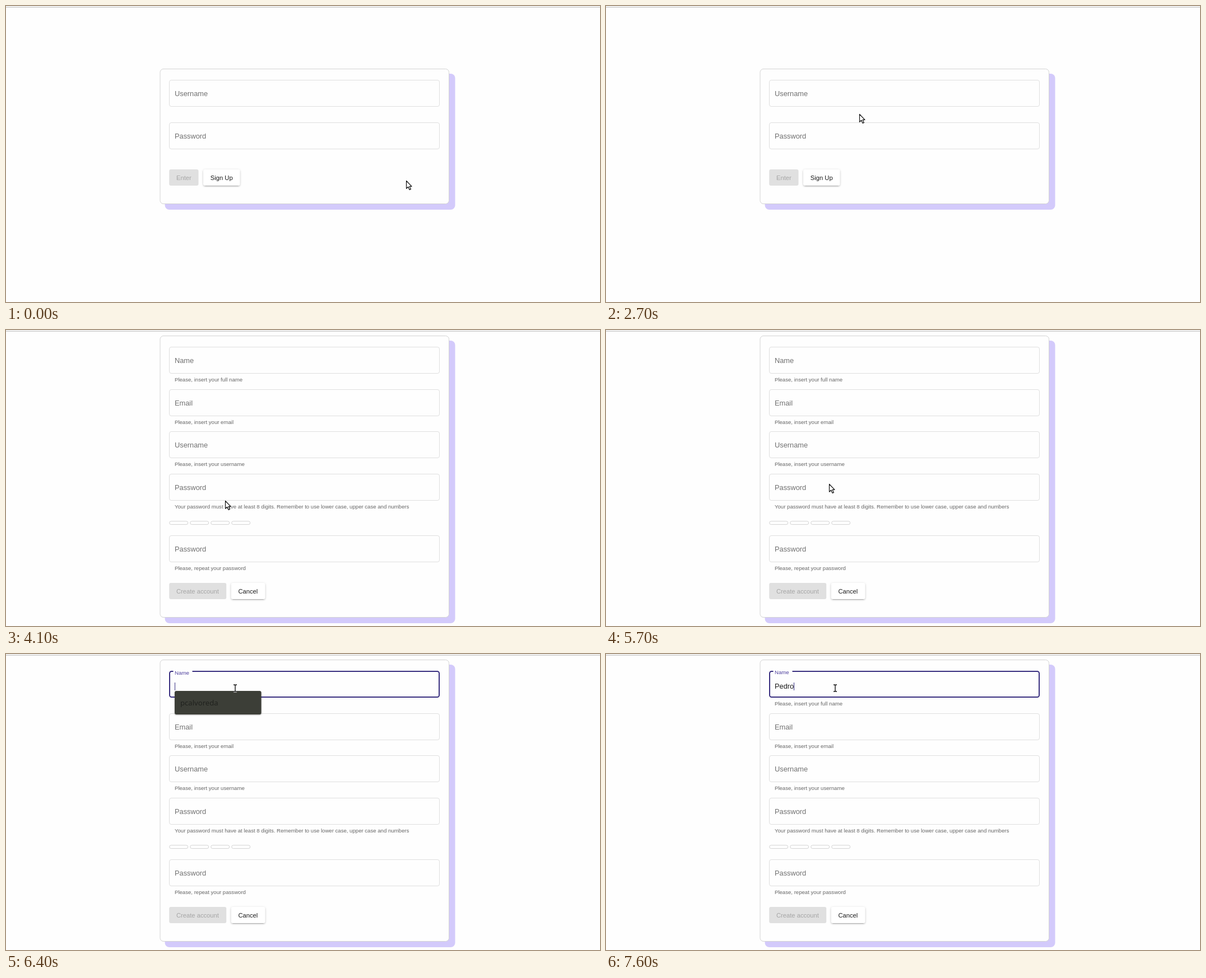
An HTML page for the animation above (8 s loop, 1060 px wide and 529 px high).

```html
<!DOCTYPE html>
<html lang="en">
<head>
<meta charset="utf-8">
<title>Sign up form</title>
<style>
  html, body { margin: 0; width: 100%; height: 100%; overflow: hidden; background: #fefefe; }
  svg { display: block; width: 1060px; height: 529px; }
  text { font: 12.8px "Liberation Sans", Arial, sans-serif; fill: #707070; white-space: pre; }
  .hint { font-size: 9.6px; fill: #666; }
  .btn { font-size: 11.2px; fill: #1c1c1c; }
  .off { fill: #a5a5a5; }
  .typed { fill: #1c1c1c; }
  .option { font: 13.1px "Noto Sans", sans-serif; fill: #20221e; }
  .line { fill: none; stroke: #dfdfdf; }
  .hover { fill: none; stroke: #212121; stroke-width: 1.6; }
  .focus { fill: none; stroke: #392f80; stroke-width: 2; }
  .pointer { fill: #fff; stroke: #111; stroke-width: 1.2; stroke-linejoin: round; }
</style>
</head>
<body>
<svg id="stage" viewBox="0 0 1060 529" xmlns="http://www.w3.org/2000/svg"></svg>
<script>
const NS = "http://www.w3.org/2000/svg";
const stage = document.getElementById("stage");
const LOOP = 8000, STEP = 100;

function add(parent, tag, attrs, content) {
  const el = document.createElementNS(NS, tag);
  for (const key in attrs) el.setAttribute(key, attrs[key]);
  if (content) el.textContent = content;
  parent.appendChild(el);
  return el;
}
const set = (el, attrs) => { for (const key in attrs) el.setAttribute(key, attrs[key]); };
const show = (el, on) => el.setAttribute("visibility", on ? "inherit" : "hidden");
const rect = (p, x, y, width, height, rx, attrs) =>
  add(p, "rect", { x, y, width, height, rx, ...attrs });
const text = (p, x, y, cls, str) => add(p, "text", { x, y, class: cls }, str);

// Linear interpolation through rows of [time, value, value, ...]
function track(rows, t) {
  if (t <= rows[0][0]) return rows[0].slice(1);
  for (let i = 1; i < rows.length; i++) {
    const a = rows[i - 1], b = rows[i];
    if (t <= b[0]) {
      const k = (t - a[0]) / (b[0] - a[0]);
      return a.slice(1).map((v, j) => v + (b[j + 1] - v) * k);
    }
  }
  return rows[rows.length - 1].slice(1);
}

function card(p, y, h) {
  rect(p, 283.5, y + 9, 518, h + 2, 8, { fill: "#d3cafb", style: "filter:blur(.7px)" });
  rect(p, 275, y + .5, 515.5, h, 6, { fill: "#fefefe", stroke: "#d3d3d3" });
}

function field(p, y, label, hint) {
  const box = { y };
  box.line = rect(p, 291.5, y + .5, 482, 47, 3.5, { class: "line" });
  box.hover = rect(p, 292, y + 1, 481, 46, 3.5, { class: "hover" });
  box.label = text(p, 301, y + 29, "", label);
  if (hint) text(p, 301, y + 62, "hint", hint);
  return box;
}

function flatButton(p, y, w, label) {
  rect(p, 291.2, y, w, 29, 3, { fill: "#e0e0e0" });
  text(p, 304, y + 18.5, "btn off", label);
}

function raisedButton(p, x, y, w, label) {
  const shade = (dy, blur, inset, opacity) =>
    rect(p, x + inset, y + dy + inset, w - 2 * inset, 29 - 2 * inset, 3,
      { opacity, style: `filter:blur(${blur}px)` });
  shade(2.4, .4, 1.6, .2);
  shade(1.6, .8, 0, .14);
  shade(.8, 2, 0, .12);
  rect(p, x, y, w, 29, 3, { fill: "#fff" });
  const ink = add(p, "g", {});
  text(p, x + 12.8, y + 18.5, "btn", label);
  return ink;
}

rect(stage, 0, 0, 1060, 529, 0, { fill: "#fefefe" });
rect(stage, 0, 0, 1060, 2, 0, { fill: "#f1f1f1" });
rect(stage, 0, 2, 1060, 1, 0, { fill: "#c9c9c9" });

// Login form
const login = add(stage, "g", {});
card(login, 112, 241);
const loginFields = [field(login, 132, "Username"), field(login, 208, "Password")];
flatButton(login, 292, 52.3, "Enter");
const ink = raisedButton(login, 352, 292, 65.6, "Sign Up");
const clip = add(add(login, "defs", {}), "clipPath", { id: "button" });
rect(clip, 352, 292, 65.6, 29, 3);
set(ink, { "clip-path": "url(#button)" });
const tint = rect(ink, 352, 292, 65.6, 29, 3, { opacity: .015 });
const ripple = add(ink, "circle", { cx: 390.5, cy: 306.5, r: 0, opacity: .11 });

// Registration form
const signup = add(stage, "g", {});
card(signup, 10, 503);
const signupFields = [
  field(signup, 30, "Name", "Please, insert your full name"),
  field(signup, 106, "Email", "Please, insert your email"),
  field(signup, 181, "Username", "Please, insert your username"),
  field(signup, 257, "Password",
    "Your password must have at least 8 digits. Remember to use lower case, upper case and numbers"),
  field(signup, 367, "Password", "Please, repeat your password")
];
for (let i = 0; i < 4; i++)
  rect(signup, 291.7 + i * 37, 341.8, 33, 5.8, 2.9, { fill: "none", stroke: "#d2d2d2" });
flatButton(signup, 452, 102, "Create account");
raisedButton(signup, 401.6, 452, 61, "Cancel");

// Focused name field
const focus = add(signup, "g", {});
rect(focus, 292, 31, 481, 46, 3.5, { class: "focus" });
rect(focus, 298.5, 29, 34, 4, 0, { fill: "#fefefe" });
const floating = text(focus, 301, 59, "", "Name");
const typed = text(focus, 301, 62, "typed", "");
const caret = rect(focus, 301, 51, 1, 14, 0, { fill: "#3b3486" });

const popup = add(signup, "g", {});
rect(popup, 301, 67, 154.5, 42, 3, { opacity: .35, style: "filter:blur(1px)" });
rect(popup, 301, 66, 154.5, 42, 3, { fill: "#3c3e37" });
const row = rect(popup, 301, 72, 154.5, 30, 0, { fill: "#46483f" });
text(popup, 311, 91.5, "option", "pcalvoreda");

// Pointers, drawn around their hot spots
const pointers = {
  arrow: add(stage, "path", { class: "pointer",
    d: "M.5 .5V14.2L3.7 11.2 6.1 16.4 8.4 15.4 6 10.3H10Z" }),
  hand: add(stage, "path", { class: "pointer",
    d: "M-1.6 1.2Q-.2-.8 1.2 1.2V5L6.5 5.8Q8.3 6.3 8.2 8L7.4 12V15H-1V12.5L-4.6 9.2Q-4.8 7.2-2.8 7.8L-1.6 8.8Z" }),
  beam: add(stage, "g", {})
};
for (const [stroke, width] of [["#fff", 3], ["#111", 1.4]])
  add(pointers.beam, "path", { d: "M-3-6H-1L0-5 1-6H3M0-5V5M-3 6H-1L0 5 1 6H3",
    fill: "none", stroke, "stroke-width": width });

const path = [
  [200, 714, 312], [400, 667, 315], [600, 582, 318], [700, 561, 319],
  [1700, 561, 319], [1800, 559, 306], [1900, 559, 306],
  [2000, 556, 297], [2200, 526, 222], [2300, 505, 190], [2400, 487, 168], [2500, 470, 172],
  [2600, 458, 186], [2700, 452, 193], [2800, 449, 207], [3000, 436, 234],
  [3200, 412, 266], [3400, 393, 291], [3500, 393, 291],
  [3600, 391, 302], [3700, 391, 305], [5600, 391, 305],
  [5700, 398, 275], [5900, 402, 208], [6100, 407, 116], [6200, 409, 76], [6300, 409, 61]
];
const labelRise = [[6200, 0], [6300, .7], [6400, .96], [6500, .96], [6600, 1]];
const rippleSize = [[3700, 0], [3800, 11], [3900, 19.5]];
const name = "Pedro";

const inside = (box, [x, y]) => x > 291 && x < 774 && y >= box.y && y < box.y + 48;

function render(ms) {
  const t = Math.floor(ms / STEP) * STEP;
  const registering = t >= 4100, focused = t >= 6300;
  const [x, y] = track(path, t);
  show(login, !registering);
  show(signup, registering);

  // The page reacts one step behind the pointer
  const seen = track(path, t - STEP), before = track(path, t - 2 * STEP);
  let overField = false;
  for (const box of registering ? signupFields : loginFields) {
    const over = inside(box, seen);
    overField = overField || over;
    set(box.hover, { opacity: over ? (inside(box, before) ? .7 : .4) : 0 });
  }

  show(tint, t >= 3600);
  set(ripple, { r: track(rippleSize, t)[0] });

  const nameBox = signupFields[0];
  for (const part of [nameBox.line, nameBox.hover, nameBox.label]) show(part, !focused);
  show(focus, focused);
  const rise = track(labelRise, t)[0];
  floating.setAttribute("y", 59 - 23 * rise);
  floating.style.fontSize = 12.8 - 3.2 * rise + "px";
  floating.style.fill = "#50429f";

  const count = t < 7100 ? 0 : t < 7300 ? 1 : Math.min(name.length, (t - 7300) / STEP + 2);
  typed.textContent = name.slice(0, count);
  set(caret, { x: Math.round(301 + (count ? typed.getComputedTextLength() : 0)) });
  show(caret, focused && (t < 6800 || t >= 7100));
  show(popup, t >= 6400 && t < 7300);
  show(row, t >= 7100 && t < 7300);

  const kind = t >= 3600 && t < 4100 ? "hand" : overField ? "beam" : "arrow";
  for (const key in pointers) {
    show(pointers[key], key === kind);
    set(pointers[key], { transform: `translate(${x} ${y})` });
  }
}

const start = performance.now();
function tick() {
  render((performance.now() - start) % LOOP);
  requestAnimationFrame(tick);
}
tick();
</script>
</body>
</html>
```
